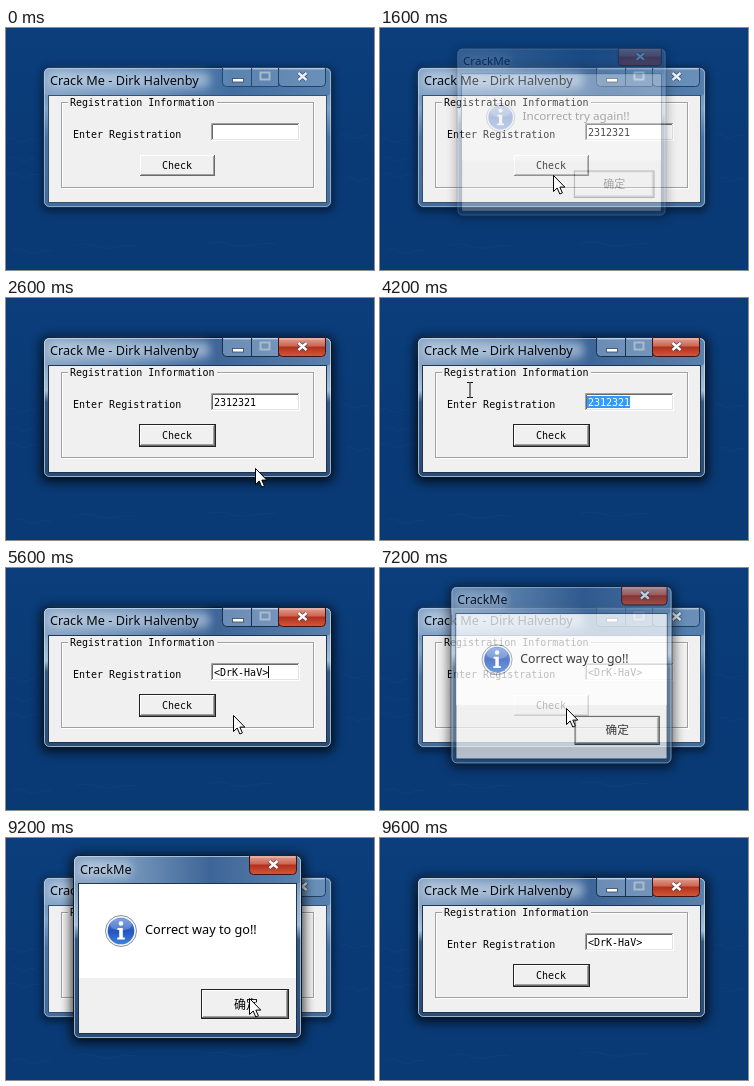
Animation, 368 px wide and 242 px high, one loop 10000 ms. Source, as an HTML page:

```html
<!DOCTYPE html>
<html lang="en">
<head>
<meta charset="utf-8">
<title>Crack Me</title>
<style>
  html, body { margin: 0; width: 100%; height: 100%; overflow: hidden; background: #093a76; }
  svg { display: block; width: 368px; height: 242px; }
  .ui { font: 12.7px "Noto Sans", "Noto Sans CJK SC", "Noto Sans CJK", sans-serif; }
  .mono { font: 10px "DejaVu Sans Mono", "Liberation Mono", monospace; }
  text { white-space: pre; }
</style>
</head>
<body>
<svg id="stage" viewBox="0 0 368 242" xmlns="http://www.w3.org/2000/svg"></svg>
<script>
const LOOP = 10000, STEP = 200;
const WRONG = "2312321", RIGHT = "<DrK-HaV>";
const stage = document.getElementById("stage");

const rect = (x, y, w, h, fill, extra = "") =>
  `<rect x="${x}" y="${y}" width="${w}" height="${h}" fill="${fill}" ${extra}/>`;
const path = (d, stroke, width = 1, extra = "") =>
  `<path d="${d}" fill="none" stroke="${stroke}" stroke-width="${width}" ${extra}/>`;
const label = (x, y, cls, str, extra = "") =>
  `<text x="${x}" y="${y}" class="${cls}" ${extra}>${str.replace(/</g, "&lt;")}</text>`;
const gradient = (id, axis, stops) =>
  `<linearGradient id="${id}" x1="0" y1="0" x2="${axis === "x" ? 1 : 0}" y2="${axis === "y" ? 1 : 0}">` +
  stops.map(([at, color, alpha = 1]) =>
    `<stop offset="${at}" stop-color="${color}" stop-opacity="${alpha}"/>`).join("") + `</linearGradient>`;

// Aero frame: shadow, glass, highlights and the edge around the client area
function glass(x, y, w, h, active) {
  const kind = active ? "On" : "Off";
  return rect(x - 2, y, w + 4, h + 4, "#000", `rx="8" opacity="${active ? .75 : .42}" filter="url(#soft${kind})"`) +
    rect(x + .5, y + .5, w - 1, h - 1, `url(#frame${kind})`, `rx="6" stroke="${active ? "#0a1829" : "#15304f"}"`) +
    rect(x + 1, y + 1, w - 2, 28, `url(#title${kind})`, `rx="5"`) +
    rect(x + 1.5, y + 1.5, w - 3, h - 3, "none", `rx="5" stroke="#d5e6f8" stroke-opacity="${active ? .65 : .5}"`) +
    rect(x + 5.5, y + 28.5, w - 11, h - 34, "#f0f0f0", `stroke="${active ? "#1d3450" : "#34506f"}"`);
}

const titleText = (x, y, w, str) =>
  rect(x - 2, y - 13, w, 16, "#e2ecf8", `rx="7" opacity=".5" filter="url(#glow)"`) +
  label(x, y, "ui", str, `fill="#05080c"`);

const cross = (x, y, color) =>
  path(`M${x - 4} ${y - 3.5}l8 7m0-7l-8 7`, "#27384d", 4.2, `opacity=".65"`) +
  path(`M${x - 4} ${y - 3.5}l8 7m0-7l-8 7`, color, 2.4);

const closeButton = (x, y, active) =>
  `<path d="M${x} ${y}h47v15q0 4-4 4h-39q-4 0-4-4z" fill="${active ? "url(#red)" : "#b5cbe2"}"` +
  ` fill-opacity="${active ? 1 : .22}" stroke="${active ? "#3b1518" : "#26405f"}" stroke-width="1"/>` +
  path(`M${x + 1.5} ${y + 1.5}h44`, "#fff", 1, `opacity=".4"`) +
  cross(x + 24, y + 9, active ? "#fff" : "#e9eff6");

function captionButtons(active) {
  const line = active ? "#17304f" : "#29486c";
  return `<path d="M216.5 39.5h56v19h-52q-4 0-4-4z" fill="#bfd4ea" fill-opacity="${active ? .34 : .2}" stroke="${line}"/>` +
    path("M218 41h27m2 0h25", "#fff", 1, `opacity=".4"`) + path("M245.5 40v18", line) +
    rect(226.5, 50.5, 11, 3.5, "#fff", `stroke="#34475e" stroke-width=".8"`) +
    rect(254.5, 44.5, 9, 7, "none", `stroke="#a9bacb" stroke-width="2"`) +
    closeButton(272.5, 39.5, active);
}

const bevel = (x, y, w, h) =>
  rect(x, y, w, h, "#696969") + rect(x, y, w - 1, h - 1, "#fff") +
  rect(x + 1, y + 1, w - 2, h - 2, "#a0a0a0") + rect(x + 1, y + 1, w - 3, h - 3, "#f0f0f0");

const frameLine = (x, y, w, h, id = "") => rect(x + .5, y + .5, w - 1, h - 1, "none", `${id} stroke="#222"`);

const mainWindow = () =>
  `<g id="mainOff">${glass(37, 39, 289, 141, false)}${captionButtons(false)}</g>` +
  `<g id="mainOn">${glass(37, 39, 289, 141, true)}${captionButtons(true)}</g>` +
  titleText(44, 57, 162, "Crack Me - Dirk Halvenby") +
  rect(56.5, 75.5, 252, 85, "none", `stroke="#fff"`) +
  rect(55.5, 74.5, 252, 85, "none", `stroke="#a0a0a0"`) +
  rect(62, 70, 149, 10, "#f0f0f0") +
  label(64, 78, "mono", "Registration Information") +
  label(67, 110, "mono", "Enter Registration") +
  rect(205, 95, 89, 18, "#fff") + path("M205.5 112V95.5H293", "#a0a0a0") +
  path("M206.5 111V96.5H292", "#696969") + path("M206 111.5H292.5V97", "#e3e3e3") +
  rect(207, 98, 43, 12, "#3399ff", `id="selection"`) +
  label(208, 108, "mono", "", `id="entry"`) +
  rect(208, 98, 1, 12, "#000", `id="caret"`) +
  bevel(134, 127, 75, 21) + frameLine(133, 126, 77, 23, `id="checkFocus"`) +
  label(156, 141, "mono", "Check", `id="check"`);

const dialogBox = () =>
  glass(67, 17, 229, 184, true) +
  closeButton(243.5, 17.5, true) +
  titleText(74, 36, 54, "CrackMe") +
  rect(73, 46, 217, 94, "#fff") +
  `<circle cx="115" cy="93" r="15.5" fill="#f4f6f9" stroke="#8c929b"/>` +
  `<circle cx="115" cy="93" r="13.3" fill="url(#info)"/>` +
  `<ellipse cx="115" cy="86.5" rx="11" ry="6" fill="#fff" opacity=".22"/>` +
  `<circle cx="115" cy="85.5" r="2.3" fill="#fff"/>` +
  `<path d="M111.5 90h5.3v9.5h2v2h-7.6v-2h2v-7.5h-1.7z" fill="#fff"/>` +
  label(139, 96, "ui", "", `id="message"`) +
  bevel(196, 152, 86, 28) + frameLine(195, 151, 88, 30) +
  label(239, 170, "ui", "确定", `id="ok" text-anchor="middle" style="font-size:12px"`);

const ripples = [[0, 112, 30], [4, 131, 26], [0, 147, 34], [334, 108, 30], [340, 151, 24], [70, 218, 60], [200, 216, 70], [6, 223, 40]]
  .map(([x, y, w]) => path(`M${x} ${y}q${w / 6}-4 ${w / 3} 0t${w / 3} 1t${w / 3}-1`, "#2a5a92", .8, `opacity=".22"`)).join("");

stage.innerHTML = `<defs>
  <filter id="softOn" x="-20%" y="-20%" width="140%" height="140%"><feGaussianBlur stdDeviation="5.5"/></filter>
  <filter id="softOff" x="-20%" y="-20%" width="140%" height="140%"><feGaussianBlur stdDeviation="3.5"/></filter>
  <filter id="glow" x="-20%" y="-60%" width="140%" height="220%"><feGaussianBlur stdDeviation="4"/></filter>
  ${gradient("sky", "y", [[0, "#0b3e7b"], [.5, "#093a76"], [1, "#0a3a74"]])}
  ${gradient("frameOn", "y", [[0, "#557ba6"], [.22, "#8eabc9"], [.38, "#a5bdd6"], [.46, "#35587f"], [1, "#2b4d75"]])}
  ${gradient("frameOff", "y", [[0, "#5f86b1"], [.3, "#7fa2c6"], [.5, "#4a74a3"], [1, "#416c9c"]])}
  ${gradient("titleOn", "x", [[0, "#8ba6c5"], [.3, "#6d8fb6"], [.6, "#3d6597"], [1, "#5b81ac"]])}
  ${gradient("titleOff", "x", [[0, "#86a5c8"], [.35, "#6c91bb"], [.65, "#416da0"], [1, "#5580ae"]])}
  ${gradient("red", "y", [[0, "#e2a396"], [.45, "#cc6652"], [.5, "#b2301c"], [1, "#d2583a"]])}
  ${gradient("info", "y", [[0, "#5b8be0"], [.5, "#2455bd"], [1, "#3f80dd"]])}
  </defs>` +
  rect(0, 0, 368, 242, "url(#sky)") + ripples + mainWindow() +
  `<g id="dialog">${dialogBox()}</g>` +
  `<path id="arrow" d="M.5.5v16l3.7-3.5 2.6 6 2.6-1.1-2.6-5.8h5z" fill="#fff" stroke="#000"/>` +
  path("M-3 .5h2.5l.5.5.5-.5h2.5M0 1v14M-3 15.5h2.5l.5-.5.5.5h2.5", "#000", 1, `id="beam"`);

const el = Object.fromEntries([...stage.querySelectorAll("g[id],rect[id],text[id],path[id]")].map(n => [n.id, n]));
const show = (node, on) => node.setAttribute("display", on ? "inline" : "none");
const between = (t, from, to) => t >= from && t < to;

// Pointer stops: time, x, y, shape
const pointer = [
  [0], [1000, 205, 139, "arrow"], [1200, 182, 143, "arrow"], [1400, 173, 147, "arrow"],
  [1800, 190, 151, "arrow"], [2000, 236, 165, "arrow"], [2200, 249, 170, "arrow"],
  [3600, 258, 140, "arrow"], [3800, 268, 98, "beam"], [4000, 222, 94, "beam"], [4200, 90, 84, "beam"],
  [4400, 8, 80, "beam"], [4600, 189, 125, "arrow"], [4800, 192, 125, "arrow"],
  [5400, 210, 138, "arrow"], [5600, 227, 147, "arrow"], [5800, 232, 152, "arrow"],
  [6000, 214, 150, "arrow"], [6200, 200, 146, "arrow"], [6600, 190, 142, "arrow"],
  [6800, 186, 140, "arrow"], [7600, 185, 134, "arrow"], [7800, 183, 100, "arrow"],
  [8000, 188, 113, "arrow"], [8200, 206, 132, "arrow"], [8400, 226, 150, "arrow"],
  [8600, 238, 157, "arrow"], [8800, 243, 160, "arrow"], [9400]
];

// How far the message box has opened, 0 to 1
const openness = [
  [0, 0], [1600, .3], [1800, .8], [2000, 1], [2400, .45], [2600, 0],
  [7200, .74], [7400, 1], [9400, .45], [9600, 0]
];

// Caret changes: time, visible
const carets = [
  [0, 0], [200, 1], [1400, 0], [4600, 1], [4800, 0], [5000, 1], [5800, 0], [6000, 1], [6600, 0]
];

const latest = (list, t) => list.filter(([start]) => start <= t).pop();

function entryText(t) {
  if (t < 400) return "";
  if (t < 600) return WRONG.slice(0, 4);
  if (t < 4600) return WRONG;
  return t < 5400 ? "" : RIGHT;
}

function render(time) {
  const t = Math.floor(time / STEP) * STEP;
  const active = between(t, 200, 1600) || between(t, 2400, 7200) || t >= 9400;
  const open = latest(openness, t)[1];
  const text = entryText(t);
  const selected = between(t, 4000, 4600);

  show(el.mainOn, active);
  show(el.mainOff, !active);
  show(el.checkFocus, active);
  show(el.selection, selected);
  el.entry.textContent = text;
  el.entry.setAttribute("fill", selected ? "#fff" : "#000");
  show(el.caret, latest(carets, t)[1]);
  el.caret.setAttribute("x", 208 + text.length * 6);
  const pressed = t === 1400 || t === 7000;
  el.check.setAttribute("transform", pressed ? "translate(1 1)" : "");

  show(el.dialog, open > 0);
  const scale = .88 + .12 * open;
  el.dialog.setAttribute("opacity", open);
  el.dialog.setAttribute("transform",
    `translate(181.5 ${109 - 7 * (1 - open)}) scale(${scale}) translate(-181.5 -109)`);
  el.message.textContent = t < 5000 ? "Incorrect try again!!" : "Correct way to go!!";
  el.ok.setAttribute("transform", t === 2200 || t === 9200 ? "translate(1 1)" : "");

  const [, x, y, shape] = latest(pointer, t);
  for (const name of ["arrow", "beam"]) {
    show(el[name], shape === name);
    if (shape === name) el[name].setAttribute("transform", `translate(${x} ${y})`);
  }
}

const start = performance.now();
function tick() {
  render((performance.now() - start) % LOOP);
  requestAnimationFrame(tick);
}
render(0);
requestAnimationFrame(tick);
</script>
</body>
</html>
```
